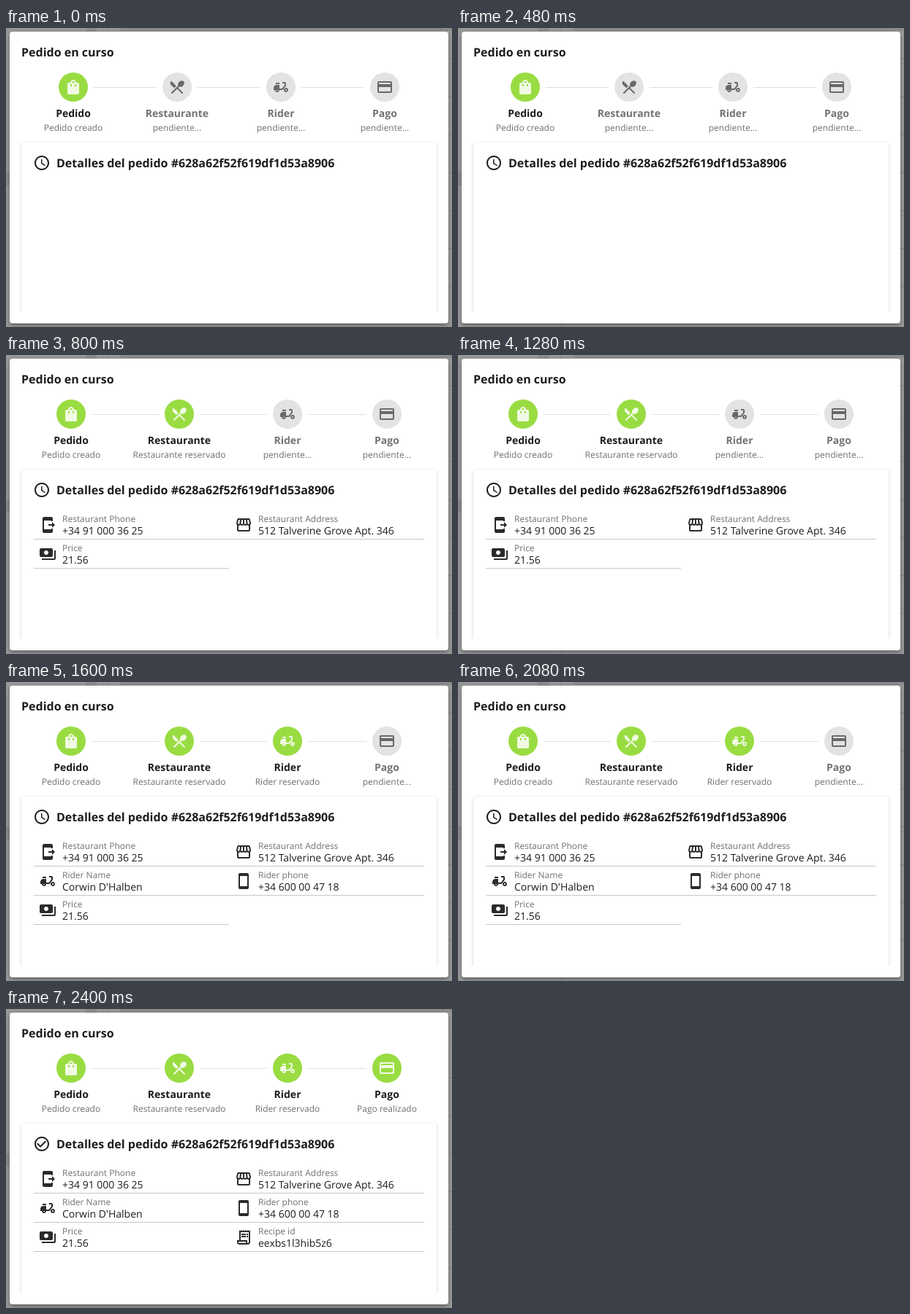
These frames come from a looping animation (610 px wide and 410 px high, 3200 ms). An HTML page:

```html
<!DOCTYPE html>
<html lang="es">
<head>
<meta charset="utf-8">
<title>Pedido en curso</title>
<style>
  html, body { margin: 0; width: 100%; height: 100%; overflow: hidden; background: #999; }
  .stage { position: relative; width: 610px; height: 410px; overflow: hidden; background: #999; }
  .page, .view { position: absolute; left: 0; top: 0; display: block; }
  .dialog {
    position: absolute; left: 5px; top: 5px; width: 600px; height: 400px;
    border-radius: 4px; background: #fff;
    box-shadow: 0 2px 4px -1px rgba(0,0,0,.2), 0 4px 5px rgba(0,0,0,.14), 0 1px 10px rgba(0,0,0,.12);
  }
  .clip { position: absolute; left: 11px; top: 145px; width: 578px; height: 239px; overflow: hidden; }
  .card {
    position: absolute; left: 5px; top: 7px; width: 568px; height: 260px;
    border-radius: 4px; background: #fff;
    box-shadow: 0 1px 5px rgba(0,0,0,.14), 0 1px 2px rgba(0,0,0,.08);
  }
  text { font-family: "Open Sans", "Noto Sans", sans-serif; text-rendering: geometricPrecision; fill: #1d1d1d; }
  .head { font-size: 16px; font-weight: 700; }
  .step { font-size: 14px; font-weight: 700; text-anchor: middle; }
  .note { font-size: 12px; text-anchor: middle; fill: #707070; }
  .label { font-size: 12px; fill: #707070; }
  .value { font-size: 14px; }
  .off { fill: #737373; }
  .state { opacity: 0; animation: show 3.2s step-end infinite; }
  @keyframes show {
    0% { opacity: 1; }
    25%, 100% { opacity: 0; }
  }
</style>
</head>
<body>
<div class="stage">
  <svg class="page" width="610" height="410">
    <path fill="#8c8c8c" d="M0 198h6v18H0zM109 0h15v6h-15zM140 0h1v6h-1zM157 0h453v4H157zM140 404h1v6h-1z"/>
    <path stroke="#858585" d="M604 42.5h6m-6 52h6m-6 52h6m-6 52h6m-6 52h6m-6 52h6m-6 52h6"/>
  </svg>
  <div class="dialog"><div class="clip"><div class="card"></div></div></div>
  <svg class="view" id="view" width="610" height="410">
    <text class="head" x="21" y="39">Pedido en curso</text>
    <text class="head" x="69" y="191">Detalles del pedido #628a62f52f619df1d53a8906</text>
  </svg>
</div>
<script>
const ring = 'M11.99 2C6.47 2 2 6.48 2 12s4.47 10 9.99 10C17.52 22 22 17.52 22 12S17.52 2 11.99 2zM12 20c-4.42 0-8-3.58-8-8s3.58-8 8-8 8 3.58 8 8-3.58 8-8 8z';
const icons = {
  clock: ring + 'M12.5 7H11v6l5.25 3.15.75-1.23-4.5-2.67z',
  check: ring + 'M16.59 7.58L10 14.17l-3.59-3.58L5 12l5 5 8-8z',
  bag: 'M18 6h-2c0-2.21-1.79-4-4-4S8 3.79 8 6H6c-1.1 0-2 .9-2 2v12c0 1.1.9 2 2 2h12c1.1 0 2-.9 2-2V8c0-1.1-.9-2-2-2zm-8 4c0 .55-.45 1-1 1s-1-.45-1-1V8h2v2zm2-6c1.1 0 2 .9 2 2h-4c0-1.1.9-2 2-2zm4 6c0 .55-.45 1-1 1s-1-.45-1-1V8h2v2z',
  cutlery: 'M8.1 13.34l2.83-2.83L3.91 3.5c-1.56 1.56-1.56 4.09 0 5.66l4.19 4.18zm6.78-1.81c1.53.71 3.68.21 5.27-1.38 1.91-1.91 2.28-4.65.81-6.12-1.46-1.46-4.2-1.1-6.12.81-1.59 1.59-2.09 3.74-1.38 5.27L3.7 19.87l1.41 1.41L12 14.41l6.88 6.88 1.41-1.41L13.41 13l1.47-1.47z',
  scooter: 'M19 7c0-1.1-.9-2-2-2h-3v2h3v2.65L13.52 14H10V9H6c-2.21 0-4 1.79-4 4v3h2c0 1.66 1.34 3 3 3s3-1.34 3-3h4.48L19 10.35V7zM7 17c-.55 0-1-.45-1-1h2c0 .55-.45 1-1 1zM5 6h5v2H5zM19 13c-1.66 0-3 1.34-3 3s1.34 3 3 3 3-1.34 3-3-1.34-3-3-3zm0 4c-.55 0-1-.45-1-1s.45-1 1-1 1 .45 1 1-.45 1-1 1z',
  credit: 'M20 4H4c-1.11 0-1.99.89-1.99 2L2 18c0 1.11.89 2 2 2h16c1.11 0 2-.89 2-2V6c0-1.11-.89-2-2-2zm0 14H4v-6h16v6zm0-10H4V6h16v2z',
  send: 'M17 18H7V6h10v1h2V3c0-1.1-.9-2-2-2H7C5.9 1 5 1.9 5 3v18c0 1.1.9 2 2 2h10c1.1 0 2-.9 2-2v-4h-2v1zM22 12l-4-4v3h-5v2h5v3z',
  store: 'M21.9 8.89l-1.05-4.37c-.22-.9-1-1.52-1.91-1.52H5.05c-.9 0-1.69.63-1.9 1.52L2.1 8.89c-.24 1.02-.02 2.06.62 2.88.08.11.19.19.28.29V19c0 1.1.9 2 2 2h14c1.1 0 2-.9 2-2v-6.94c.09-.09.2-.18.28-.28.64-.82.87-1.87.62-2.89zm-2.99-3.9l1.05 4.37c.1.42.01.84-.25 1.17-.14.18-.44.47-.94.47-.61 0-1.14-.49-1.21-1.14L16.98 5l1.93-.01zM13 5h1.96l.54 4.52c.05.39-.07.78-.33 1.07-.22.26-.54.41-.95.41-.67 0-1.22-.59-1.22-1.31V5zM8.49 9.52L9.04 5H11v4.69c0 .72-.55 1.31-1.29 1.31-.34 0-.65-.15-.89-.41-.25-.29-.37-.68-.33-1.07zm-4.45-.16L5.05 5h1.97l-.58 4.86c-.08.65-.6 1.14-1.21 1.14-.49 0-.8-.29-.93-.47-.27-.32-.36-.75-.26-1.17zM5 19v-6.03c.08.01.15.03.23.03.87 0 1.66-.36 2.24-.95.6.6 1.4.95 2.31.95.87 0 1.65-.36 2.23-.93.59.57 1.39.93 2.29.93.84 0 1.64-.35 2.24-.95.58.59 1.37.95 2.24.95.08 0 .15-.02.23-.03V19H5z',
  cash: 'M19 14V6c0-1.1-.9-2-2-2H3c-1.1 0-2 .9-2 2v8c0 1.1.9 2 2 2h14c1.1 0 2-.9 2-2zm-9-1c-1.66 0-3-1.34-3-3s1.34-3 3-3 3 1.34 3 3-1.34 3-3 3zm13-6v11c0 1.1-.9 2-2 2H4v-2h17V7h2z',
  phone: 'M17 1.01L7 1c-1.1 0-2 .9-2 2v18c0 1.1.9 2 2 2h10c1.1 0 2-.9 2-2V3c0-1.1-.9-1.99-2-1.99zM17 19H7V5h10v14z',
  receipt: 'M19.5 3.5L18 2l-1.5 1.5L15 2l-1.5 1.5L12 2l-1.5 1.5L9 2 7.5 3.5 6 2v14H3v3c0 1.66 1.34 3 3 3h12c1.66 0 3-1.34 3-3V2l-1.5 1.5zM15 20H6c-.55 0-1-.45-1-1v-1h10v2zm4-1c0 .55-.45 1-1 1s-1-.45-1-1v-3H8V5h11v14zM9 7h6v2H9zM16 7h2v2h-2zM9 10h6v2H9zM16 10h2v2h-2z'
};

const steps = [
  ['Pedido', 'Pedido creado', 'bag'],
  ['Restaurante', 'Restaurante reservado', 'cutlery'],
  ['Rider', 'Rider reservado', 'scooter'],
  ['Pago', 'Pago realizado', 'credit']
];

// [first state, icon, label, value]
const fields = [
  [1, 'send', 'Restaurant Phone', '+34 91 000 36 25'],
  [1, 'store', 'Restaurant Address', '512 Talverine Grove Apt. 346'],
  [2, 'scooter', 'Rider Name', "Corwin D'Halben"],
  [2, 'phone', 'Rider phone', '+34 600 00 47 18'],
  [1, 'cash', 'Price', '21.56'],
  [3, 'receipt', 'Recipe id', 'eexbs1l3hib5z6']
];

const icon = (name, cx, cy, fill) =>
  `<path transform="translate(${cx - 12} ${cy - 12})" fill="${fill}" d="${icons[name]}"/>`;
const text = (cls, x, y, s) => `<text class="${cls}" x="${x}" y="${y}">${s}</text>`;
const rule = (x1, x2, y, fill) => `<rect x="${x1}" y="${y}" width="${x2 - x1}" height="1" fill="${fill}"/>`;

function stepper(state) {
  const xs = state ? [89, 237, 385, 521] : [92, 234, 376, 518];
  return steps.map(([title, note, name], i) => {
    const x = xs[i], on = i <= state;
    return (i ? rule(xs[i - 1] + 28, x - 28, 81, '#e0e0e0') : '') +
      `<circle cx="${x}" cy="81" r="20" fill="${on ? '#99dc42' : '#e3e3e3'}"/>` +
      icon(name, x, 81, on ? '#f0fae3' : '#696969') +
      text(on ? 'step' : 'step off', x, 122, title) +
      text('note', x, 141, on ? note : 'pendiente...');
  }).join('');
}

function details(state) {
  return fields.filter(f => f[0] <= state).map(([, name, label, value], i) => {
    const col = i % 2, x = 37 + col * 268, y = 213 + (i >> 1) * 40;
    return icon(name, x + 20, y + 20, '#2b2b2b') +
      text('label', x + 40, y + 16, label) +
      text('value', x + 40, y + 33, value) +
      rule(col ? 305 : 38, col ? 572 : 305, y + 39, '#c8c8c8');
  }).join('');
}

document.getElementById('view').innerHTML += steps.map((_, s) =>
  `<g class="state" style="animation-delay:${s * 800 - 3200}ms">` +
  stepper(s) + icon(s === 3 ? 'check' : 'clock', 49, 185, '#1d1d1d') + details(s) + '</g>'
).join('');
</script>
</body>
</html>
```
